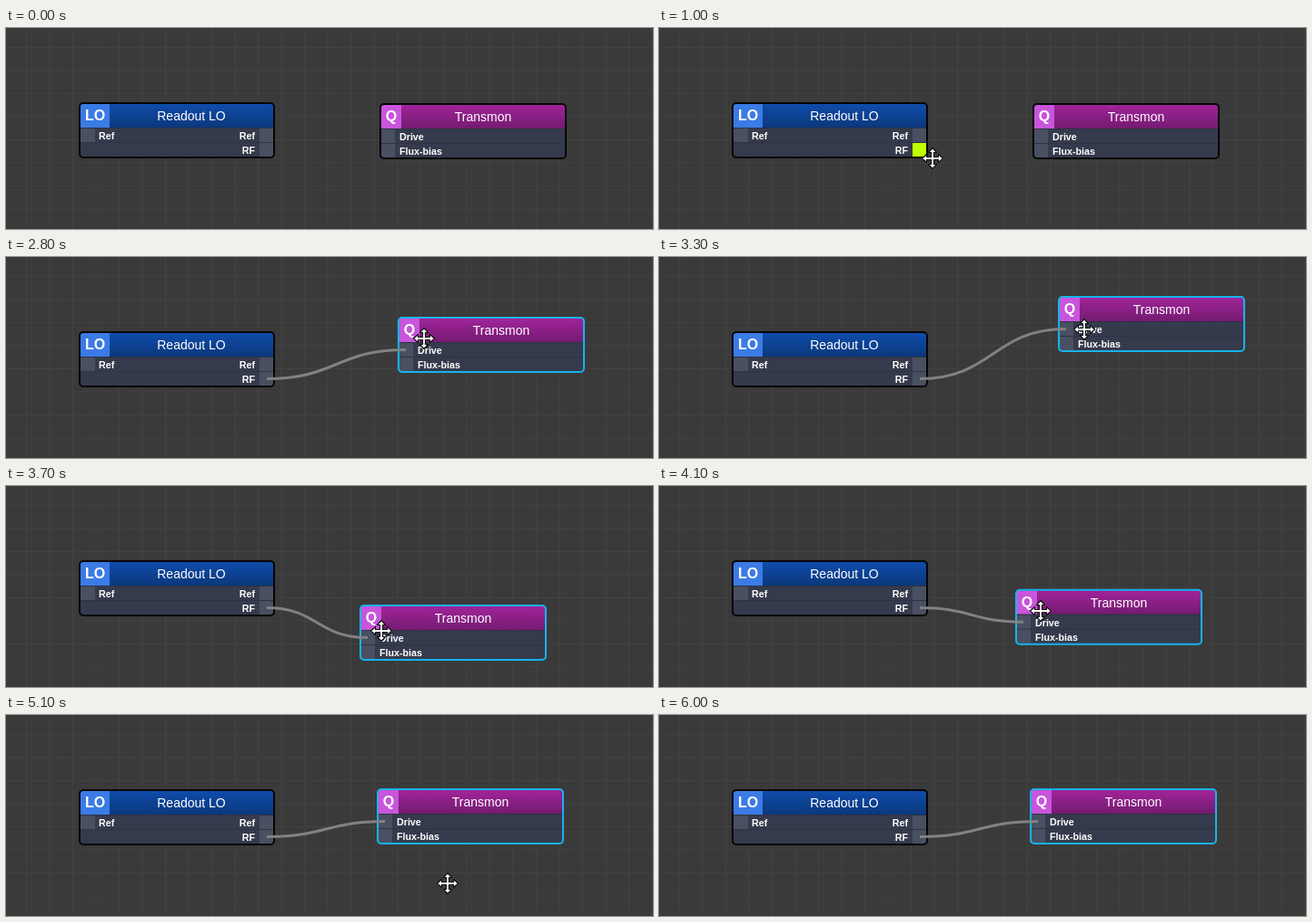
Write an HTML page that moves like this. It is 712 px wide and 222 px high and loops after 6100 ms.

```html
<!DOCTYPE html>
<html lang="en">
<head>
<meta charset="utf-8">
<title>Node editor</title>
<style>
  html, body { margin: 0; width: 100%; height: 100%; overflow: hidden; background: #3a3a3a; }
  svg { display: block; width: 712px; height: 222px; font-family: "Liberation Sans", Arial, sans-serif; fill: #fff; }
  .title { font-size: 14px; text-anchor: middle; }
  .badge { font-size: 16px; font-weight: bold; text-anchor: middle; }
  .label { font-size: 10.7px; font-weight: bold; }
  .end { text-anchor: end; }
  .port { fill: #495061; }
  .port.hot { fill: #bfff00; }
  .frame { fill: none; stroke: #050507; stroke-width: 2; }
  .selected .frame { stroke: #18b2ec; }
  .wire { fill: none; stroke: #828282; stroke-width: 3; }
  .wire.pending { stroke: #12b3f2; stroke-dasharray: 9 4; }
</style>
</head>
<body>
<svg viewBox="0 0 712 222">
  <defs>
    <pattern id="grid" x="22" y="21" width="25.5" height="25.5" patternUnits="userSpaceOnUse">
      <path d="M.5 0V25.5M0 .5H25.5" stroke="#424242" fill="none"/>
    </pattern>
    <linearGradient id="blue" x2="0" y2="1">
      <stop stop-color="#0f4cab"/><stop offset="1" stop-color="#0b387b"/>
    </linearGradient>
    <linearGradient id="purple" x2="0" y2="1">
      <stop stop-color="#a0249a"/><stop offset="1" stop-color="#741b70"/>
    </linearGradient>
  </defs>
  <rect width="712" height="222" fill="#3a3a3a"/>
  <rect width="712" height="222" fill="url(#grid)"/>

  <g transform="translate(80 82)">
    <rect x="1" y="1" width="214" height="60" rx="4" fill="#353b4c"/>
    <rect x="2" y="2" width="212" height="26" fill="url(#blue)"/>
    <rect x="2" y="2" width="32" height="26" fill="#3b7be6"/>
    <path d="M2 28.5H214M2 44.5H214" stroke="#2d3342"/>
    <rect class="port" x="2" y="29" width="16" height="15"/>
    <rect class="port" x="199" y="29" width="15" height="15"/>
    <rect class="port" id="rf" x="199" y="45" width="15" height="15"/>
    <text class="badge" x="18" y="20">LO</text>
    <text class="title" x="124" y="20">Readout LO</text>
    <text class="label" x="22" y="41">Ref</text>
    <text class="label end" x="194" y="41">Ref</text>
    <text class="label end" x="194" y="57">RF</text>
    <rect class="frame" x="1" y="1" width="214" height="60" rx="4"/>
  </g>

  <g id="transmon">
    <rect x="1" y="1" width="204" height="60" rx="4" fill="#353b4c"/>
    <rect x="2" y="2" width="202" height="26" fill="url(#purple)"/>
    <rect x="2" y="2" width="22" height="26" fill="#c855dc"/>
    <path d="M2 28.5H204M2 44.5H204" stroke="#2d3342"/>
    <rect class="port" x="2" y="29" width="15" height="15"/>
    <rect class="port" x="2" y="45" width="15" height="15"/>
    <text class="badge" x="13" y="20">Q</text>
    <text class="title" x="114" y="20">Transmon</text>
    <text class="label" x="22" y="41">Drive</text>
    <text class="label" x="22" y="57">Flux-bias</text>
    <rect class="frame" x="1" y="1" width="204" height="60" rx="4"/>
  </g>

  <path id="wire" class="wire"/>
  <rect id="drive" class="port hot" x="413" y="112" width="15" height="15"/>

  <path id="cursor" d="M0-11.5L4.5-6.5H1.5V-1.5H6.5V-4.5L11.5 0L6.5 4.5V1.5H1.5V6.5H4.5L0 11.5L-4.5 6.5H-1.5V1.5H-6.5V4.5L-11.5 0L-6.5-4.5V-1.5H-1.5V-6.5H-4.5Z"
        fill="#fff" stroke="#111" stroke-width="1.2" stroke-linejoin="round"/>
</svg>
<script>
  const LOOP = 6100, STEP = 100;
  const el = id => document.getElementById(id);
  const [transmon, wire, rf, drive, cursor] = ["transmon", "wire", "rf", "drive", "cursor"].map(el);

  // Each key: time, x, y
  const nodeKeys = [
    [2500, 411, 83], [2800, 431, 66], [3000, 447, 25], [3100, 448, 18], [3300, 439, 43],
    [3500, 432, 82], [3700, 389, 131], [3900, 380, 145], [4200, 398, 98], [4500, 406, 81], [4700, 408, 81]
  ];
  const cursorKeys = [
    [300, 338, 222], [500, 318, 180], [700, 304, 150], [1000, 301, 144], [1400, 301, 144],
    [1700, 355, 141], [2000, 425, 131], [2100, 431, 130], [2300, 432, 130], [2500, 439, 110],
    [2800, 460, 90], [3000, 476, 49], [3100, 477, 48], [3300, 468, 80], [3500, 454, 118],
    [3700, 413, 160], [3900, 406, 170], [4200, 427, 122], [4500, 434, 108], [4900, 436, 108],
    [5000, 449, 140], [5100, 486, 186], [5200, 516, 236]
  ];

  function at(keys, t) {
    const i = keys.findIndex(k => k[0] > t);
    if (i < 0) return keys[keys.length - 1].slice(1);
    if (i === 0) return keys[0].slice(1);
    const [a, b] = [keys[i - 1], keys[i]];
    const p = (t - a[0]) / (b[0] - a[0]);
    return [a[1] + (b[1] - a[1]) * p, a[2] + (b[2] - a[2]) * p];
  }

  const within = (t, from, to) => t >= from && t < to;
  const show = (node, on) => node.setAttribute("visibility", on ? "visible" : "hidden");
  const move = (node, x, y) => node.setAttribute("transform", `translate(${x} ${y})`);

  function drawWire(x, y) {
    const sx = 287, sy = 134.5, mid = (sx + x) / 2;
    wire.setAttribute("d", `M${sx} ${sy}C${mid} ${sy} ${mid} ${y} ${x} ${y}`);
  }

  function render(t) {
    const [nx, ny] = at(nodeKeys, t), [cx, cy] = at(cursorKeys, t);
    const snapped = t >= 2000;
    move(transmon, nx, ny);
    move(cursor, cx, cy);
    transmon.classList.toggle("selected", t >= 2500);
    rf.classList.toggle("hot", within(t, 700, 1500));
    show(drive, within(t, 2000, 2400));
    show(cursor, within(t, 300, 5200));
    show(wire, t >= 1500);
    wire.classList.toggle("pending", t < 2300);
    // The pointer's hotspot sits up and left of its icon.
    if (snapped) drawWire(nx + 9, ny + 36.5);
    else drawWire(cx - 10, cy - 10);
  }

  const start = performance.now();
  function tick() {
    const t = (performance.now() - start) % LOOP;
    render(Math.floor(t / STEP) * STEP);
    requestAnimationFrame(tick);
  }
  tick();
</script>
</body>
</html>
```
